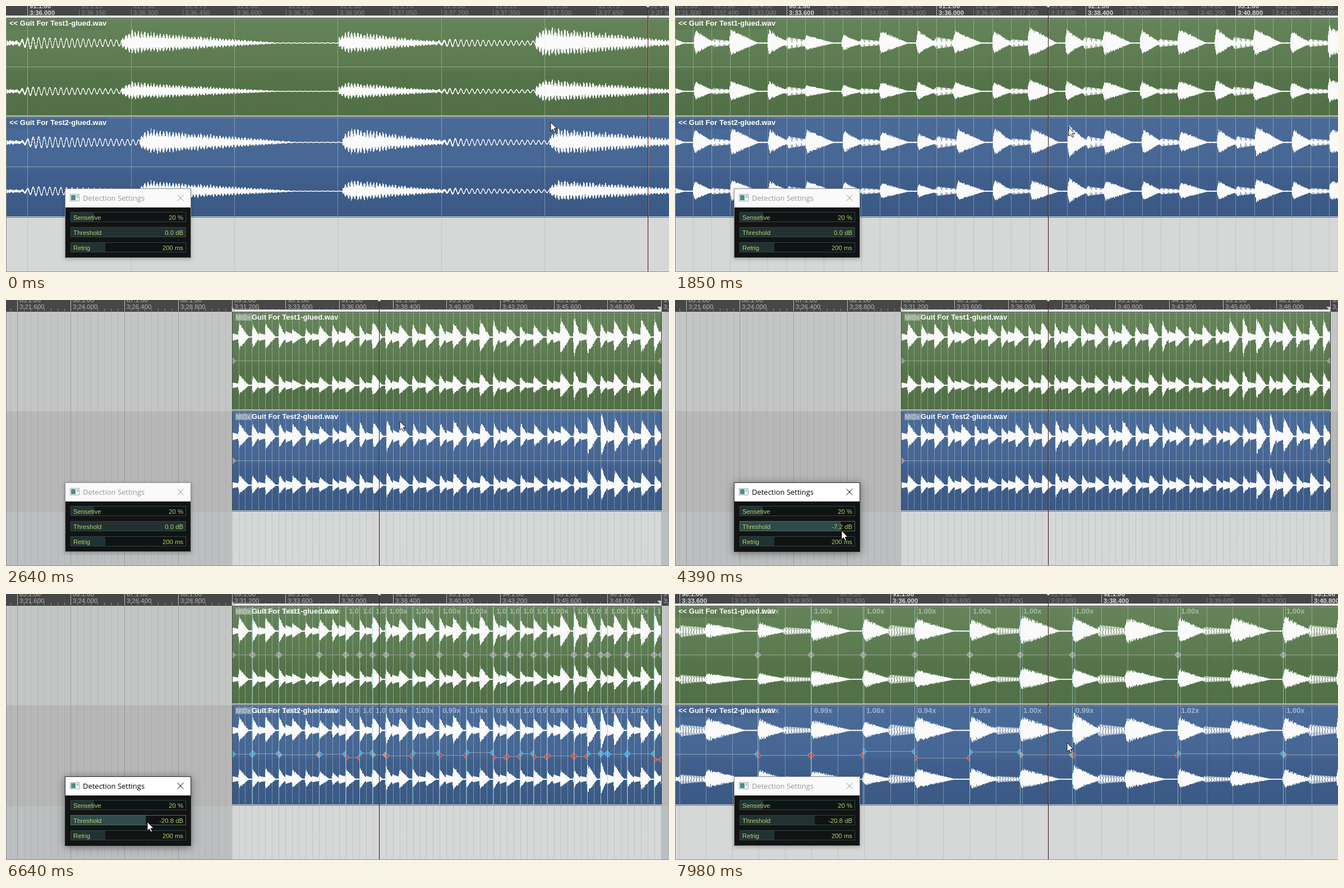
Write an HTML page with a canvas that moves like this. It is 1182 px wide and 474 px high and loops after 8000 ms.

```html
<!DOCTYPE html>
<html>
<head>
<meta charset="utf-8">
<style>
html, body { margin: 0; width: 100%; height: 100%; overflow: hidden; background: #bbbfbf; }
canvas { display: block; }
</style>
</head>
<body>
<canvas id="stage" width="1182" height="474"></canvas>
<script>
const W = 1182, H = 474, LOOP = 8000;
const c = document.getElementById('stage').getContext('2d');
const START = 211.2, END = 230.4, EDIT = 217.8, BEAT = 0.6;
const SANS = '"Liberation Sans", Arial, sans-serif';

// Note loudness per beat, and timing errors in ms
const tracks = [
  { name: 'Guit For Test1-glued.wav', top: 22, bottom: 195, mid: 108, waves: [66, 152], low: 0.75,
    shades: ['#65845a', '#5b7a50', '#56744a', '#517047'], tag: '#a3bba6',
    amps: [26, 25, 25, 26, 15, 16, 22, 25, 23, 23, 30, 27, 26, 26, 27, 30, 27, 23, 32, 33, 23, 23, 23, 19, 37, 44, 38, 27, 31, 26, 36, 37],
    late: [0, 20, -10, 0, -10, -10, -6, -13, -26, 3, -26, -28, -26, -26, -26, -30], usual: -20 },
  { name: 'Guit For Test2-glued.wav', top: 199, bottom: 375, mid: 286, waves: [243, 330], low: 0.78,
    shades: ['#4a6b98', '#466694', '#405f8c', '#3a5985'], tag: '#9cb6c8',
    amps: [24, 25, 26, 25, 24, 22, 19, 17, 25, 28, 26, 34, 26, 26, 21, 26, 30, 24, 26, 26, 21, 26, 22, 19, 22, 25, 38, 46, 34, 23, 32, 25],
    late: [5, 5, 5, 15, 5, 5, 5, 0, 26, 15, 15, 13, -10, 0, 0, 8], usual: 8 }
];

// [beat, playback rate after it]
const draft = [[1, 1.02], [3, 1], [6, 1.01], [8, 0.95], [9, 1.03], [10, 1], [11, 0.98], [13, 1.03],
  [15, 0.99], [17, 1.04], [19, 0.95], [20, 0.97], [21, 1.02], [22, 0.96], [23, 0.98], [25, 0.97],
  [26, 1.02], [27, 1.02], [27.5, 1.01], [29, 1.02], [31, 0.91]];
const settled = [[1, 1.02], [3, 1.01], [5, 0.99], [6, 0.99], [7, 1.06], [8, 0.94], [9, 1.05], [10, 1],
  [11, 0.99], [13, 1.02], [15, 1], ...draft.filter(m => m[0] > 15)];
const louder = min => draft.filter(m => tracks[0].amps[m[0] | 0] > min);

// Each step changes only what it names
const steps = [
  { t: 0, zoom: 8, edit: 1144.7, mouse: [971, 207], db: 0, active: false, marks: [] },
  { t: 280, edit: 985, mouse: [919, 209] },
  { t: 530, edit: 825, mouse: [867, 210] },
  { t: 780, zoom: 7, edit: 665.7, mouse: [815, 212] },
  { t: 1030, zoom: 6, mouse: [764, 214] },
  { t: 1310, zoom: 5, mouse: [743, 214] },
  { t: 1590, zoom: 4, mouse: [722, 215] },
  { t: 1850, zoom: 3, mouse: [702, 216] },
  { t: 2130, zoom: 2 },
  { t: 2640, zoom: 0 },
  { t: 3390, mouse: [470, 345] },
  { t: 3640, mouse: [320, 408] },
  { t: 3890, mouse: [317, 409], db: -1.2, active: true },
  { t: 4140, mouse: [308, 410], db: -3.9 },
  { t: 4390, mouse: [297, 411], db: -7.2 },
  { t: 4640, mouse: [283, 410], db: -11.2, marks: louder(30) },
  { t: 4890, mouse: [269, 409], db: -15.4, marks: louder(24) },
  { t: 5140, mouse: [259, 408], db: -18.4, marks: draft },
  { t: 5640, mouse: [256, 408], db: -19.3 },
  { t: 5890, mouse: [254, 407], db: -19.8 },
  { t: 6140, mouse: [253, 407], db: -20.3 },
  { t: 6390, mouse: [252, 406], db: -20.6 },
  { t: 6640, mouse: [252, 406], db: -20.8 },
  { t: 7170, mouse: [480, 330], marks: settled },
  { t: 7420, mouse: [751, 227], active: false },
  { t: 7700, mouse: [708, 257] },
  { t: 7980, zoom: 4, mouse: [699, 265] }
];
for (let i = 1; i < steps.length; i++) steps[i] = { ...steps[i - 1], ...steps[i] };

let now, pps;
const xOf = t => now.edit + (t - EDIT) * pps;
const timeAt = x => EDIT + (x - now.edit) / pps;
const visible = () => [Math.max(0, Math.round(xOf(START))), Math.min(W, Math.round(xOf(END)))];

function rect(x, y, w, h, color) {
  c.fillStyle = color;
  c.fillRect(x, y, w, h);
}
function text(s, x, y, font, color, align = 'left') {
  c.font = font;
  c.fillStyle = color;
  c.textAlign = align;
  c.fillText(s, x, y);
}
function shape(points, fill, stroke) {
  c.beginPath();
  points.forEach(p => c.lineTo(...p));
  c.closePath();
  c.fillStyle = fill;
  c.fill();
  if (stroke) { c.strokeStyle = stroke; c.stroke(); }
}
function vline(x, y1, y2, color, dash = []) {
  x = Math.round(x) + 0.5;
  c.setLineDash(dash);
  c.strokeStyle = color;
  c.beginPath();
  c.moveTo(x, y1);
  c.lineTo(x, y2);
  c.stroke();
  c.setLineDash([]);
}
function eachTick(unit, draw) {
  const last = timeAt(W) / 0.15;
  for (let i = Math.floor((timeAt(0) - 2.4) / 0.15 / unit) * unit; i <= last; i += unit)
    draw(i, Math.round(xOf(i * 0.15)));
}

function onset(track, k) {
  const late = track.late[k] ?? track.usual;
  return START + 0.3 + k * BEAT + late / 1000;
}
function noise(n) {
  const v = Math.sin(n * 12.9898) * 43758.5453;
  return v - Math.floor(v);
}

// Upper and lower reach of the sound at one moment
function sample(t, track, timing) {
  let k = Math.floor((t - START - 0.26) / BEAT);
  if (t < onset(timing, k)) k--;
  const d = t - onset(timing, k), odd = k & 1, amp = track.amps[k] ?? 9;
  const fade = Math.max(0, 1 - d / (odd ? 0.36 : 0.45)) ** (odd ? 1.3 : 1);
  const note = amp * Math.min(1, 0.35 + d / 0.04) * fade;
  const h = d - 0.28;
  const pickup = odd && h > 0 ? (k % 4 === 3 ? 10 : 6) * Math.min(1, h / 0.04) * (1 - 1.7 * h) : 0;
  const ripple = 0.72 + 0.28 * Math.sin(t * 691), cell = Math.floor(t * 900);
  const hum = (pickup + 0.5) * Math.sin(t * 390);
  return [note * ripple * (0.65 + 0.4 * noise(cell)) + hum,
    hum - note * ripple * (0.55 + 0.35 * noise(cell + 0.5))];
}

function drawWave(track, timing, x1, x2) {
  c.fillStyle = '#fafafa';
  for (let x = x1; x < x2; x++) {
    let hi = -99, lo = 99;
    for (let j = 0; j < 12; j++) {
      const [up, down] = sample(timeAt(x + j / 12), track, timing);
      hi = Math.max(hi, up);
      lo = Math.min(lo, down);
    }
    track.waves.forEach((y, i) => {
      const gain = i ? track.low : 1;
      c.fillRect(x, y - hi * gain - 0.7, 1, (hi - lo) * gain + 1.4);
    });
  }
}

function halfDiamond(x, y, side, rate) {
  const fill = rate > 1 ? '#43a5dc' : rate < 1 ? '#c4534b' : '#9c9e9c';
  shape([[x, y - 6], [x + 6 * side, y], [x, y + 6]], fill, 'rgba(205,215,215,.55)');
}

function drawMarkers(track, index) {
  const segs = [[START, index && now.marks.length ? 1.01 : 1],
    ...now.marks.map(([k, r]) => [onset(tracks[0], k | 0) + k % 1 * BEAT, index ? r : 1])];
  const levelOf = r => track.mid + 0.5 - (r - 1) * 95;
  segs.forEach(([t, rate], i) => {
    const a = Math.round(xOf(t)), b = Math.round(xOf(segs[i + 1]?.[0] ?? END)), y = levelOf(rate);
    rect(a, Math.round(y - 0.5), b - a, 1, 'rgba(185,195,185,.6)');
    if (!i) return;
    vline(a, track.top, track.bottom, 'rgba(150,212,215,.75)');
    c.save();
    c.beginPath();
    c.rect(a, track.top, b - a - 1, 20);
    c.clip();
    text(rate.toFixed(2) + 'x', a + 6, track.top + 13, 'bold 13px ' + SANS, track.tag);
    c.restore();
  });
  segs.forEach(([t, rate], i) => {
    const a = Math.round(xOf(t)) + 0.5, b = Math.round(xOf(segs[i + 1]?.[0] ?? END)) + 0.5;
    halfDiamond(a, levelOf(rate), 1, rate);
    halfDiamond(b, levelOf(rate), -1, rate);
  });
}

function drawItem(track, index) {
  const [x1, x2] = visible();
  const { top, bottom } = track, tall = bottom - top;
  const g = c.createLinearGradient(0, top, 0, bottom);
  [0, 0.5, 0.56, 1].forEach((p, i) => g.addColorStop(p, track.shades[i]));
  rect(x1, top - 1, x2 - x1, 1, '#2f3833');
  rect(x1, top, x2 - x1, tall, g);
  rect(x1, top, x2 - x1, 1, 'rgba(220,230,220,.35)');
  rect(x1, bottom, x2 - x1, 1, '#e6e9e6');
  rect(x1, bottom + 1, x2 - x1, 1, '#5d6264');
  c.save();
  c.beginPath();
  c.rect(x1, top, x2 - x1, tall);
  c.clip();
  drawWave(track, now.marks.length ? tracks[0] : track, x1, x2);
  eachTick(2, (i, x) => vline(x, top, bottom, 'rgba(225,230,225,.75)', [1, 1]));
  drawMarkers(track, index);
  const font = 'bold 13px ' + SANS;
  if (xOf(START) < 0) {
    rect(0, top, 178, 20, 'rgba(0,0,0,.05)');
    text('<< ' + track.name, 6, top + 13, font, '#fff');
  } else {
    rect(x1 + 6, top + 3, 29, 12, 'rgba(190,198,195,.5)');
    text('MIDx', x1 + 7, top + 13, '11px ' + SANS, 'rgba(225,230,228,.8)');
    text(track.name, x1 + 35, top + 13, font, '#fff');
  }
  c.restore();
  vline(xOf(START), top, bottom, '#3a4644');
  vline(xOf(END), top, bottom, '#2f3636');
}

function drawBackground() {
  rect(0, 0, W, H, '#bbbfbf');
  rect(0, 21, W, 177, '#c3c6c5');
  rect(0, 198, W, 180, '#b6b7b6');
  const [x1, x2] = visible();
  rect(x1, 21, x2 - x1, H, '#d6d8d7');
  eachTick(2, (i, x) => {
    const inside = x >= x1 && x <= x2;
    if (inside) vline(x, 377, 473, '#b0b2b1', [1, 1]);
    else vline(x, 21, 473, i % 16 ? 'rgba(90,95,95,.12)' : 'rgba(80,85,85,.3)');
  });
}

function drawRuler() {
  rect(0, 0, W, 21, '#474747');
  const x1 = xOf(START), x2 = xOf(END), [left, right] = visible();
  eachTick(2, (i, x) => vline(x, 15, 20, '#8a8a8a'));
  const unit = [1, 2, 4, 8, 16].find(u => u * 0.15 * pps > 60);
  eachTick(unit, (i, x) => {
    const bar = i % 16 === 0, ms = i * 150;
    const font = (bar && unit < 16 ? 'bold ' : '') + '11.4px ' + SANS;
    const color = !bar ? '#858585' : unit < 16 ? '#d6d6d6' : '#b4b4b4';
    vline(x, bar ? 0 : 6, 20, bar ? '#bdbdbd' : '#757575');
    const clock = Math.floor(ms / 60000) + ':' + (ms % 60000 / 1000).toFixed(3).padStart(6, '0');
    const beat = Math.floor(i % 16 / 4) + 1, part = String(i % 4 * 25).padStart(2, '0');
    text(`${Math.floor(i / 16) + 1}.${beat}.${part}`, x + 4, 4, font, color);
    text(clock, x + 4, 16, font, color);
  });
  rect(left, 17, right - left, 4, '#eeecf0');
  shape([[x1, 12], [x1 + 7, 20], [x1, 20]], '#c9c9c9');
  shape([[x2, 20], [x2, 12], [x2 - 7, 12]], '#c9c9c9');
}

function drawSlider(y, label, value, fill, hot) {
  rect(115, y, 206, 18, hot ? '#4a7070' : '#294848');
  rect(116, y + 1, 204, 16, '#101313');
  rect(116, y + 1, 204 * fill, 16, hot ? '#304a4a' : '#223232');
  text(label, 120, y + 14, '11.3px ' + SANS, '#b3d069');
  text(value, 316, y + 14, '11.3px ' + SANS, '#b3d069', 'right');
}

function drawPanel() {
  const { active, db } = now, ink = active ? '#000' : '#969696';
  c.save();
  c.shadowColor = active ? 'rgba(0,0,0,.45)' : 'rgba(0,0,0,.25)';
  c.shadowBlur = active ? 14 : 7;
  c.shadowOffsetY = 2;
  rect(105, 325, 225, 124, active ? '#2b2b2b' : '#8c8e8e');
  c.restore();
  rect(106, 326, 223, 122, '#131313');
  rect(106, 326, 223, 33, active ? '#fff' : '#fafafa');
  rect(114, 335, 17, 13, '#a7adb0');
  rect(115, 336, 15, 11, '#f4f6f6');
  rect(116, 337, 8, 9, '#46918c');
  rect(126, 337, 3, 5, '#b9c4c4');
  text('Detection Settings', 137, 347, '13px "Open Sans", "Noto Sans", sans-serif', ink);
  c.strokeStyle = ink;
  c.beginPath();
  c.moveTo(305.5, 336.5); c.lineTo(316.5, 347.5);
  c.moveTo(316.5, 336.5); c.lineTo(305.5, 347.5);
  c.stroke();
  drawSlider(367, 'Sensetive', '20 %', 0.2);
  drawSlider(394, 'Threshold', db.toFixed(1) + ' dB', 1 + db / 60, active);
  drawSlider(421, 'Retrig', '200 ms', 0.3);
}

function drawMouse([x, y]) {
  const arrow = [[0, 0], [0, 16], [3.7, 12.5], [6.3, 18], [8.7, 17], [6.2, 11.5], [11, 11.5]];
  shape(arrow.map(p => [x + p[0], y + p[1]]), '#fff', '#111');
}

function draw() {
  pps = 39.87 * 1.4077 ** now.zoom;
  c.lineWidth = 1;
  drawBackground();
  drawRuler();
  tracks.forEach(drawItem);
  const x = Math.floor(now.edit);
  vline(x, 0, 473, now.zoom === 8 ? '#641616' : '#391a1c');
  shape([[x - 3, 0], [x + 4, 0], [x + 0.5, 3]], '#d8d8d8');
  rect(0, 21, 1, H, '#8a8c8c');
  rect(0, 473, W, 1, '#8f9191');
  drawPanel();
  drawMouse(now.mouse);
}

function frame() {
  const t = performance.now() % LOOP;
  const step = steps.findLast(s => s.t <= t);
  if (step !== now) {
    now = step;
    draw();
  }
  requestAnimationFrame(frame);
}
frame();
</script>
</body>
</html>
```
